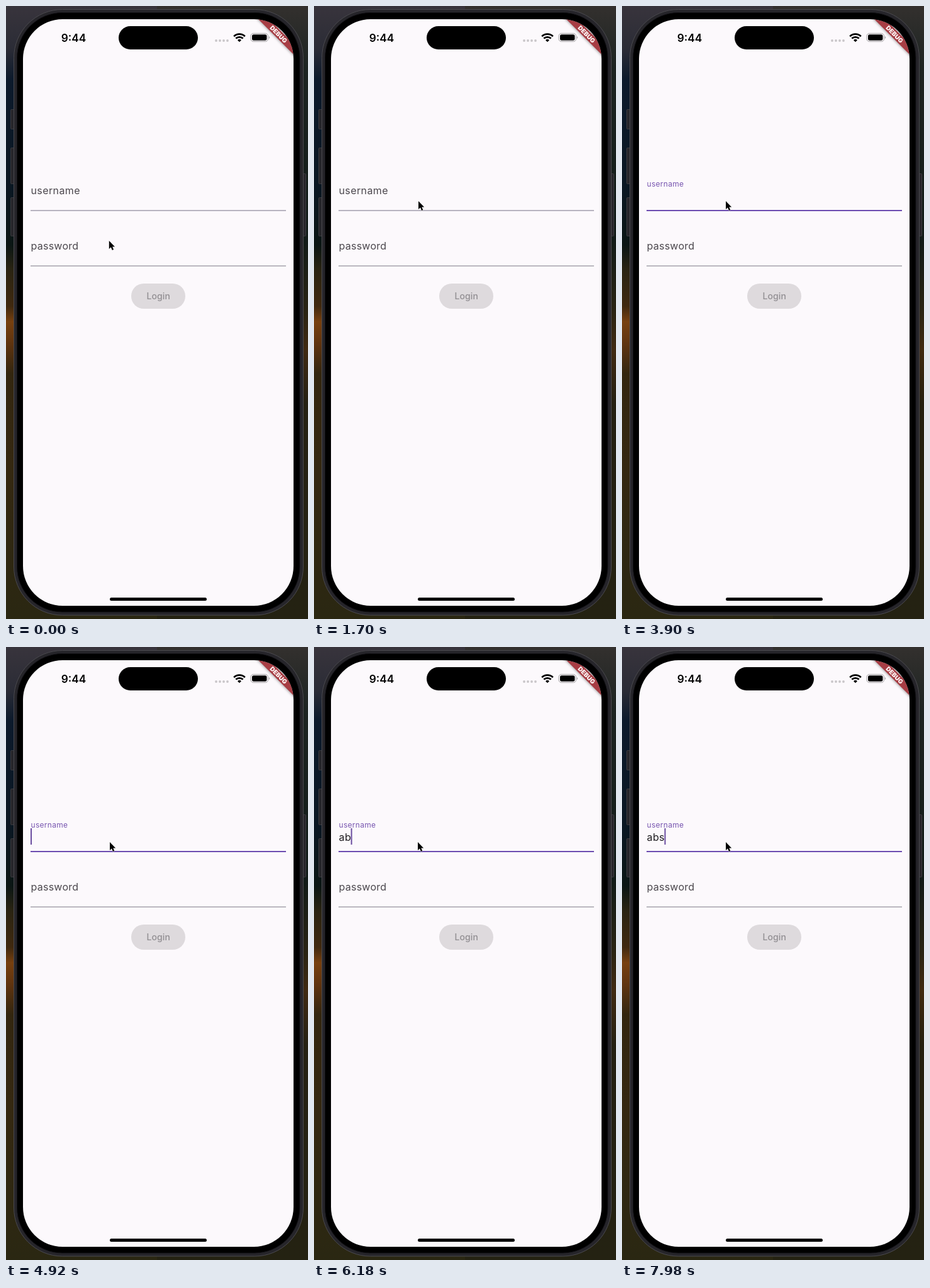
Recreate the animation shown at these times as an HTML page. Size 480x974 px, loop 8000 ms.

```html
<!DOCTYPE html>
<html lang="en">
<head>
<meta charset="utf-8">
<title>Login screen</title>
<style>
  html, body { margin: 0; width: 100%; height: 100%; overflow: hidden; background: #1c1b12; }
  svg { display: block; width: 100vw; height: 100vh; }
  text { font-family: Inter, Roboto, sans-serif; }
  .label, .value { font-size: 16px; letter-spacing: .4px; fill: #4b474d; }
  .value { fill: #1e1c20; }
  #password { letter-spacing: .25px; }
</style>
</head>
<body>
<svg viewBox="0 0 480 974" preserveAspectRatio="none">
  <defs>
    <linearGradient id="leftScene" x2="0" y2="1">
      <stop offset="0" stop-color="#38343c"/>
      <stop offset=".07" stop-color="#2b2c36"/>
      <stop offset=".12" stop-color="#0c1a2c"/>
      <stop offset=".3" stop-color="#0a1722"/>
      <stop offset=".39" stop-color="#0b1614"/>
      <stop offset=".43" stop-color="#2a2412"/>
      <stop offset=".49" stop-color="#40290f"/>
      <stop offset=".515" stop-color="#77400f"/>
      <stop offset=".55" stop-color="#60340f"/>
      <stop offset=".6" stop-color="#33260f"/>
      <stop offset=".75" stop-color="#352811"/>
      <stop offset="1" stop-color="#2a2712"/>
    </linearGradient>
    <linearGradient id="rightScene" x2="0" y2="1">
      <stop offset="0" stop-color="#33302e"/>
      <stop offset=".1" stop-color="#1d2422"/>
      <stop offset=".38" stop-color="#111b18"/>
      <stop offset=".5" stop-color="#2a2413"/>
      <stop offset=".56" stop-color="#402a12"/>
      <stop offset=".65" stop-color="#242012"/>
      <stop offset="1" stop-color="#242212"/>
    </linearGradient>
    <clipPath id="screen"><rect x="27" y="21" width="430" height="932" rx="63"/></clipPath>
    <filter id="soft" x="-20%" y="-100%" width="140%" height="300%"><feGaussianBlur stdDeviation="2.5"/></filter>
  </defs>

  <rect width="240" height="974" fill="url(#leftScene)"/>
  <rect x="240" width="240" height="974" fill="url(#rightScene)"/>

  <g fill="#26252a" stroke="#434247" stroke-width=".8">
    <rect x="7.5" y="164.5" width="6" height="31" rx="1"/>
    <rect x="7.5" y="225.5" width="6" height="57" rx="1"/>
    <rect x="7.5" y="304.5" width="6" height="61" rx="1"/>
    <rect x="471" y="266.5" width="5.5" height="99" rx="1"/>
  </g>
  <rect x="12.5" y="5.5" width="460" height="962.5" rx="77" fill="#26252a" stroke="#4b4a4f"/>
  <rect x="17.5" y="10.5" width="449.5" height="952.5" rx="72" fill="#000" stroke="#151418"/>

  <g clip-path="url(#screen)">
    <rect x="27" y="21" width="430" height="932" fill="#fcf9fc"/>
    <g transform="translate(433.25 44.75) rotate(45)">
      <rect x="-55" y="-6" width="110" height="12" fill="#000" opacity=".5" filter="url(#soft)"/>
      <rect x="-55" y="-6" width="110" height="12" fill="#a73d44"/>
      <text y="3.6" text-anchor="middle" font-size="9.8" font-weight="900" fill="#fff5f5">DEBUG</text>
    </g>
  </g>

  <text x="107.5" y="56.5" text-anchor="middle" font-size="17.3" font-weight="600">9:44</text>
  <rect x="179" y="32" width="126" height="37" rx="18.5"/>
  <path d="M334 55h20" stroke="#c9c6c9" stroke-width="3.8" stroke-linecap="round" stroke-dasharray="0 6"/>
  <g fill="none" stroke="#000" stroke-width="2.8">
    <path d="M362.2 48.3a12.6 12.6 0 0 1 17.6 0"/>
    <path d="M365.3 51.6a8.2 8.2 0 0 1 11.4 0"/>
  </g>
  <path d="M371 57.2l-3-3a4.3 4.3 0 0 1 6 0z"/>
  <rect x="389" y="43.5" width="27.5" height="13" rx="4.2" fill="none" stroke="#a19fa1"/>
  <rect x="391" y="45.3" width="23.5" height="9.4" rx="2.6"/>
  <path d="M418 48v4a2.2 2.2 0 0 0 0-4z" fill="#a19fa1"/>
  <rect x="165" y="940" width="154" height="5" rx="2.5"/>

  <path id="line" d="M39 325H445" stroke="#a09cac" stroke-width="1.4"/>
  <text id="username" class="label">username</text>
  <text id="value" class="value" x="39.5" y="308"></text>
  <rect id="caret" y="288" width="2" height="26" fill="#6a4da0"/>

  <text id="password" class="label" x="39.5" y="387">password</text>
  <path d="M39 413H445" stroke="#a5a3ab" stroke-width="1.4"/>

  <rect x="199" y="441" width="86" height="40" rx="20" fill="#dedadd"/>
  <text x="242.2" y="466" text-anchor="middle" font-size="14" font-weight="500" letter-spacing=".1" fill="#918e92">Login</text>

  <path id="pointer" d="M0 0V13L3 10.3L5 15L7.3 14L5.3 9.5H9.2Z" fill="#000" stroke="#fff" stroke-width="1" paint-order="stroke"/>
</svg>
<script>
  const LOOP = 8000, FOCUS = 2240, BLINK = 900;
  const TYPED = [[FOCUS, ''], [5350, 'a'], [5800, 'ab'], [7050, 'abs']];
  const POINTER = [[0, 163.8, 373], [350, 163.8, 373], [1250, 166, 310], [1900, 166, 310], [2100, 165, 310], [LOOP, 165, 310]];

  const [line, username, value, caret, pointer] =
    ['line', 'username', 'value', 'caret', 'pointer'].map(id => document.getElementById(id));

  const clamp = x => Math.min(1, Math.max(0, x));
  const ease = x => x * x * (3 - 2 * x);
  const mix = (a, b, k) => a + (b - a) * k;
  const mixColor = (a, b, k) => `rgb(${a.map((v, i) => Math.round(mix(v, b[i], k)))})`;

  function pointerAt(t) {
    const i = POINTER.findIndex(step => step[0] > t);
    const [t0, x0, y0] = POINTER[i - 1], [t1, x1, y1] = POINTER[i];
    const k = ease((t - t0) / (t1 - t0));
    return [mix(x0, x1, k), mix(y0, y1, k)];
  }

  // Solid for most of the cycle, then a stepped fade out and back in.
  function caretAlpha(phase) {
    const fade = phase < .75 ? (.65 - phase) / .15 : (phase - .85) / .15;
    return Math.ceil(clamp(fade) * 4) / 4;
  }

  function render(t) {
    const k = ease(clamp((t - FOCUS) / 167));
    username.setAttribute('transform', `translate(39.5 ${mix(299, 287, k)}) scale(${mix(1, .75, k)})`);
    username.style.fill = mixColor([75, 71, 77], [120, 86, 176], k);
    line.setAttribute('stroke', mixColor([160, 156, 172], [108, 76, 176], k));
    line.setAttribute('stroke-width', mix(1.4, 2, k));

    const entry = TYPED.filter(([at]) => at <= t).pop();
    const text = entry ? entry[1] : '';
    if (value.textContent !== text) value.textContent = text;
    caret.setAttribute('x', 39 + (text ? value.getComputedTextLength() : 0));
    caret.setAttribute('opacity', entry ? caretAlpha((t - entry[0]) % BLINK / BLINK) : 0);

    pointer.setAttribute('transform', `translate(${pointerAt(t)})`);
  }

  const start = performance.now();
  function tick() {
    render((performance.now() - start) % LOOP);
    requestAnimationFrame(tick);
  }
  tick();
</script>
</body>
</html>
```
